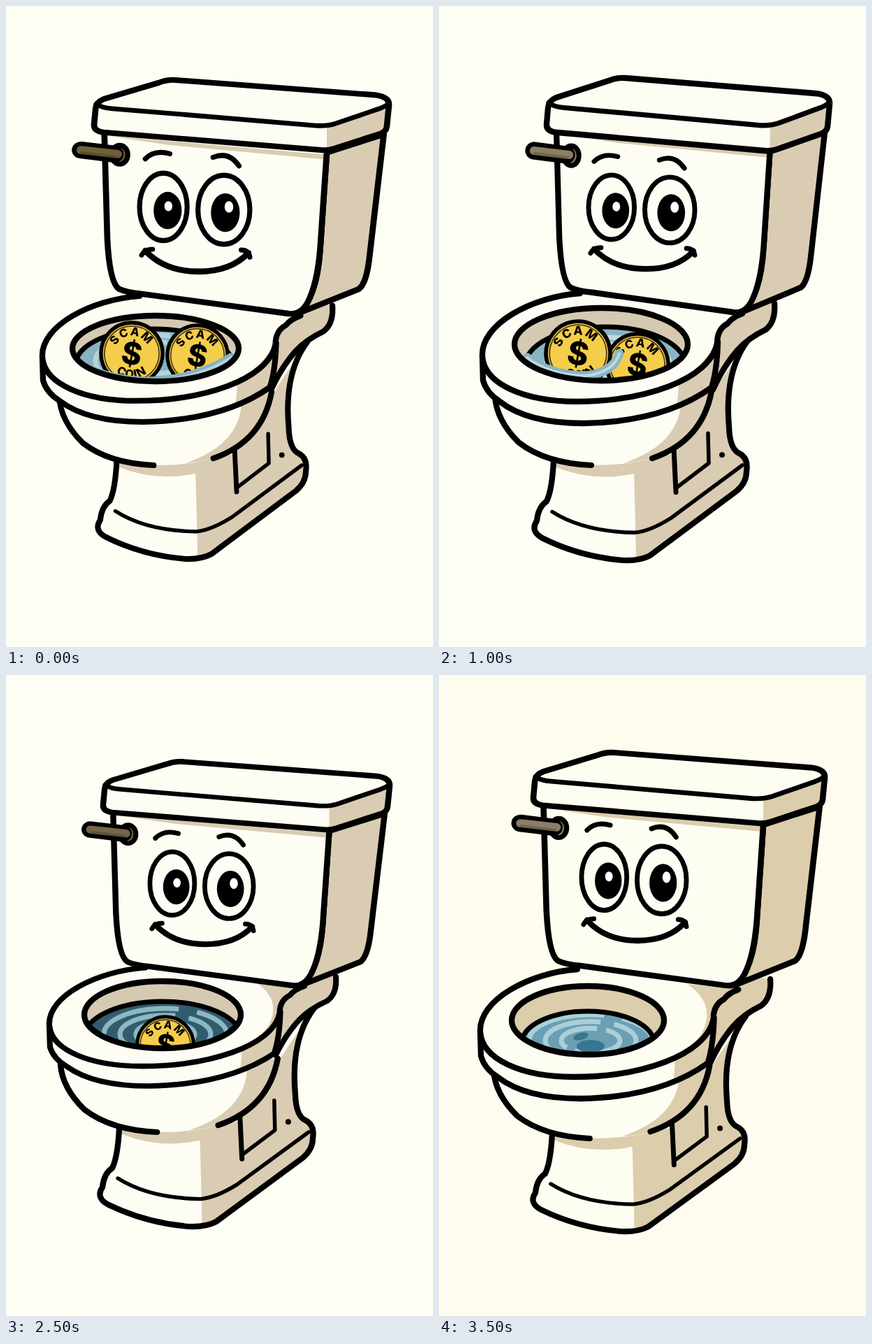
An HTML page for the animation above (4000 ms loop, 611x917 px).

```html
<!DOCTYPE html>
<html lang="en">
<head>
<meta charset="utf-8">
<title>Flushed coins</title>
<style>
  html, body { margin: 0; height: 100%; overflow: hidden; }
  svg { display: block; width: 100vw; height: 100vh; }
  .line { fill: none; stroke: #000; stroke-width: 8.3; stroke-linecap: round; stroke-linejoin: round; }
  .mid { stroke-width: 7; }
  .thin { stroke-width: 5.5; }
  text { font: 800 17px Inter, "Open Sans", sans-serif; letter-spacing: 1.5px; text-anchor: middle; }
  .dollar { font-size: 45px; letter-spacing: 0; }
</style>
</head>
<body>
<svg id="stage" viewBox="0 0 611 917"></svg>
<script>
const STEP = 500;
const stage = document.getElementById('stage');

// Boxes are left, top, right, bottom; lid is the bottom of the lid; hole and water are cx, cy, rx, ry;
// coins are x, y, radius, angle, word.
const poses = [
  { tank: [124, 106, 549, 440], lid: 207, face: [188, 234, 352, 385], seat: [50, 412, 467, 595], base: [130, 656, 430, 792],
    hole: [214, 490, 119, 47], water: [212, 512, 112, 50], look: 'plain', handle: '#706139',
    coins: [[274, 500, 46, 0], [180, 497, 47, 0]],
    blue: '#88b2c0', light: '#b5d3da', front: 'M104 512Q140 534 200 537Q270 536 322 503' },
  { tank: [148, 105, 554, 437], lid: 209, face: [211, 234, 370, 381], seat: [58, 408, 478, 596], base: [133, 654, 439, 793],
    hole: [231, 484, 124, 52], water: [235, 515, 118, 56], look: 'plain', handle: '#8b7f60',
    coins: [[311, 503, 42, 8], [291, 501, 48, 0], [195, 498, 50, 0]],
    blue: '#8dbacb', light: '#c9dfe5', front: 'M122 493Q138 526 195 532Q254 529 259 498' },
  { tank: [152, 103, 560, 438], lid: 208, face: [211, 237, 369, 381], seat: [60, 408, 480, 597], base: [135, 656, 441, 794],
    hole: [232, 484, 124, 52], water: [238, 515, 115, 56], look: 'plain', handle: '#8b7f60',
    coins: [[284, 513, 47, 0], [199, 497, 49, -8]],
    blue: '#8ab5c3', light: '#bfd9df', front: 'M126 503Q160 529 210 529Q250 524 258 497' },
  { tank: [150, 110, 555, 440], lid: 213, face: [207, 241, 363, 381], seat: [63, 409, 478, 598], base: [137, 658, 439, 793],
    hole: [232, 484, 124, 52], water: [240, 515, 112, 56], look: 'cream', handle: '#9b8d6c',
    coins: [[203, 495, 48, -18], [274, 532, 47, 0, 'COIN']],
    blue: '#83adb9', light: '#b9d5d9', front: 'M128 514Q170 525 205 523Q235 512 250 493', frontFirst: true },
  { tank: [140, 110, 554, 442], lid: 213, face: [204, 244, 359, 385], seat: [56, 413, 475, 600], base: [134, 659, 439, 797],
    hole: [228, 488, 117, 50], water: [230, 520, 112, 54], look: 'plain', handle: '#85785a',
    coins: [[214, 509, 45, -10], [266, 540, 43, 0, 'COIN']],
    blue: '#5e909f', light: '#a2c8d0', front: 'M126 516Q175 529 210 526Q236 520 250 504', frontFirst: true },
  { tank: [137, 124, 550, 444], lid: 222, face: [203, 248, 357, 390], seat: [60, 416, 472, 588], base: [133, 653, 440, 790],
    hole: [224, 486, 112, 48], water: [224, 518, 112, 51], look: 'plain', handle: '#75684a',
    coins: [[228, 529, 43, 0]], blue: '#315c6b', light: '#8bb8c2', seatShadow: true },
  { tank: [159, 110, 559, 439], lid: 206, face: [221, 236, 376, 382], seat: [65, 416, 479, 590], base: [134, 652, 444, 788],
    hole: [231, 488, 117, 48], water: [240, 522, 113, 50], look: 'warm', handle: '#85683c',
    coins: [], blue: '#4cb1d3', light: '#2b7fa5', spiral: true },
  { tank: [133, 111, 553, 444], lid: 213, face: [201, 237, 357, 385], seat: [57, 418, 474, 606], base: [133, 662, 438, 797],
    hole: [213, 494, 109, 49], water: [213, 527, 95, 46], look: 'pale', handle: '#8b7e68',
    coins: [], blue: '#6b9fb3', light: '#a9d0d9', drain: true, seatShadow: true }
];
for (const pose of poses) pose.top = [...pose.tank.slice(0, 3), pose.lid];

const looks = {
  plain: { bg: '#fdfef4', body: '#fefdf4', shade: '#d9ccb2', wall: '#d6c9b2' },
  cream: { bg: '#fdfef4', body: '#fdf7ea', shade: '#d6c8ac', wall: '#cdbfa4' },
  warm: { bg: '#fdfcee', body: '#fdf5e7', shade: '#d9caaa', wall: '#c5b292' },
  pale: { bg: '#fdfcee', body: '#fefdf1', shade: '#dccdac', wall: '#dccdac' }
};
const home = poses[1];

const fill = (d, color) => `<path d="${d}" fill="${color}"/>`;
const line = (d, weight = '') => `<path class="line ${weight}" d="${d}"/>`;
const oval = ([cx, cy, rx, ry], attrs = '') => `<ellipse cx="${cx}" cy="${cy}" rx="${rx}" ry="${ry}" ${attrs}/>`;

// Moves a part from its home box to the box of the current pose.
function fit(part, pose, content) {
  const a = home[part], b = pose[part];
  const sx = (b[2] - b[0]) / (a[2] - a[0]), sy = (b[3] - b[1]) / (a[3] - a[1]);
  return `<g transform="matrix(${sx} 0 0 ${sy} ${b[0] - a[0] * sx} ${b[1] - a[1] * sy})">${content}</g>`;
}

function drawBase({ body, shade }) {
  const foot = 'M162 648Q160 690 152 707Q140 715 138 735Q128 750 146 760Q200 787 262 792Q285 793 300 785L424 692Q438 680 438 664Q441 645 428 638Q414 632 413 600Q406 520 440 475L380 500Z';
  const left = 'M78 555Q80 590 112 622Q150 652 216 655', right = 'Q375 620 388 548';
  return fill(foot, body)
    + fill('M160 650L330 640L440 475Q406 520 413 600Q414 632 428 638Q441 645 438 664Q438 680 424 692L300 785Q290 792 280 792Q279 730 277 667Q220 680 163 657Z', shade)
    + line(foot)
    + fill(`${left}Q270 655 303 645${right}Z`, body)
    + fill(`M344 550Q350 622 262 652Q285 650 303 645${right}Z`, shade)
    + line(left) + line('M303 645' + right)
    + line('M160 722Q205 751 278 752Q300 750 330 731L432 655', 'thin')
    + line('M334 630L337 694', 'mid') + line('M337 688L384 652L383 609', 'thin')
    + '<circle cx="403" cy="640" r="4"/>';
}

function drawSeat({ body, shade }, shadow) {
  const support = 'M478 425Q480 452 465 463Q440 475 425 492Q405 515 390 548';
  const rim = 'M60 500L61 535Q66 553 85 565Q125 596 205 596Q320 594 388 545Q396 520 397 480';
  const top = 'M200 411C130 416 58 455 60 500C62 540 120 565 195 565C290 565 385 535 396 482Q396 462 411 454Q418 445 432 440';
  return fill(support + 'L380 540L400 450L440 420Z', shade) + line(support)
    + fill(rim + 'Z', body) + fill('M342 530L338 577Q365 565 388 545Q396 520 397 480Z', shade) + line(rim)
    + fill(top + 'Z', body)
    + fill('M396 482Q385 525 338 546Q372 515 396 482Z', shade)
    + (shadow ? fill('M358 432Q404 462 376 508Q362 530 338 546Q388 525 396 482Q396 462 411 454L432 440Z', shade) : '')
    + line(top);
}

function drawTank({ body, shade }) {
  const front = 'M164 182L168 330Q171 393 184 402Q194 407 215 409L415 437Q432 440 442 421Q455 395 459 345L468 208';
  const side = 'M468 208L546 182L526 360Q522 394 512 402L428 437Q455 415 459 345Z';
  return fill(side, shade) + line(side) + fill(front + 'Z', body)
    + fill('M166 184L468 211L468 218L250 197Z', shade) + line(front);
}

function drawLid({ body, shade }, handle) {
  const lid = 'M150 170L152 147Q153 137 163 133L238 109Q250 104 262 105L535 127Q554 130 553 142L550 174Q549 181 541 184L478 206Q470 209 460 208L163 182Q149 180 150 170Z';
  const lever = (d, color, width) => `<path d="${d}" stroke="${color}" stroke-width="${width}" stroke-linecap="round"/>`;
  return fill(lid, body) + fill('M468 173L553 139L550 174Q549 181 541 184L468 209Z', shade) + line(lid)
    + line('M153 140Q160 146 175 147L453 172Q468 173 480 169L540 147Q552 142 553 138', 'mid')
    + oval([185, 215, 11, 14], `class="line mid" style="fill:${handle}"`)
    + lever('M132 208L178 214', '#000', 25)
    + lever('M132 208L182 214', handle, 12)
    + lever('M133 212L180 218', '#0003', 4);
}

function drawFace() {
  const eye = (white, pupil, shine) => oval(white, 'class="line mid"') + oval(pupil) + oval(shine, 'fill="#fff"');
  return eye([247, 286, 33, 47], [253, 291, 19.5, 26], [254, 285, 5.5, 7])
    + eye([331, 290, 36, 48], [333, 294, 20, 27], [338, 286, 6, 8])
    + line('M222 219Q235 206 256 212', 'mid') + line('M316 217Q338 208 352 229', 'mid')
    + line('M222 347Q249 376 296 376Q341 376 365 350')
    + line('M217 353Q221 345 232 345', 'mid') + line('M355 346Q365 346 367 356', 'mid');
}

function drawCoin([x, y, radius, angle, word = 'SCAM']) {
  const arc = (id, label) => `<text><textPath href="#${id}" startOffset="50%">${label}</textPath></text>`;
  return `<g transform="translate(${x} ${y}) rotate(${angle}) scale(${radius / 48})">`
    + '<circle r="45" class="line thin" style="fill:#f4cd4b"/>'
    + '<circle r="40" fill="none" stroke="#4c3c14" stroke-width="1.8"/>'
    + arc('upper', word) + arc('lower', 'COIN')
    + `<text class="dollar" y="16" transform="rotate(${10 - angle})">$</text></g>`;
}

function spiral(cx, cy, turns) {
  let d = '';
  for (let a = 0; a < turns * 2 * Math.PI; a += 0.2) {
    const r = 10 + 5.6 * a;
    d += `${d ? 'L' : 'M'}${cx + r * Math.cos(a + 2)} ${cy + r * 0.42 * Math.sin(a + 2)}`;
  }
  return d;
}

function drawWater(pose) {
  const { water, blue, light, front } = pose, [cx, cy] = water;
  let ripples = '';
  if (pose.spiral) {
    ripples = `<path d="${spiral(238, 512, 2.6)}" fill="none" stroke="${light}" stroke-width="6"/>`;
  } else {
    for (const r of [42, 65, 88]) {
      ripples += oval([cx + 4, cy - 4, r, r * 0.42], `fill="none" stroke="${light}" stroke-width="7" stroke-dasharray="${r * 1.7} ${r * 0.3}"`);
    }
  }
  if (pose.drain) {
    ripples += oval([cx + 4, cy + 4, 20, 9], 'fill="#397790"')
      + oval([cx - 10, cy - 10, 11, 5], 'fill="#397790" transform="rotate(-15 203 517)"');
  }
  const wave = front ? `<g fill="none" stroke-linecap="round"><path d="${front}" stroke="${blue}" stroke-width="13"/><path d="${front}" stroke="${light}" stroke-width="4"/></g>` : '';
  const coins = pose.coins.map(drawCoin);
  coins.splice(pose.frontFirst ? 1 : coins.length, 0, wave);
  return oval(water, `fill="${blue}"`) + ripples + oval(water, 'class="line mid"') + coins.join('');
}

function draw(pose) {
  const look = looks[pose.look];
  stage.innerHTML = `<defs>
      <clipPath id="bowl">${oval(pose.hole)}</clipPath>
      <path id="upper" d="M-26 0A26 26 0 0 1 26 0"/>
      <path id="lower" d="M-36 0A36 36 0 0 0 36 0"/>
    </defs>
    <rect width="611" height="917" fill="${look.bg}"/>`
    + fit('base', pose, drawBase(look))
    + fit('seat', pose, drawSeat(look, pose.seatShadow))
    + oval(pose.hole, `fill="${look.wall}"`)
    + `<g clip-path="url(#bowl)">${drawWater(pose)}</g>`
    + oval(pose.hole, 'class="line"')
    + fit('tank', pose, drawTank(look))
    + fit('top', pose, drawLid(look, pose.handle))
    + fit('face', pose, drawFace());
}

let shown = -1;
function tick(now) {
  const step = Math.floor(now / STEP) % poses.length;
  if (step !== shown) draw(poses[shown = step]);
  requestAnimationFrame(tick);
}
tick(performance.now());
</script>
</body>
</html>
```
